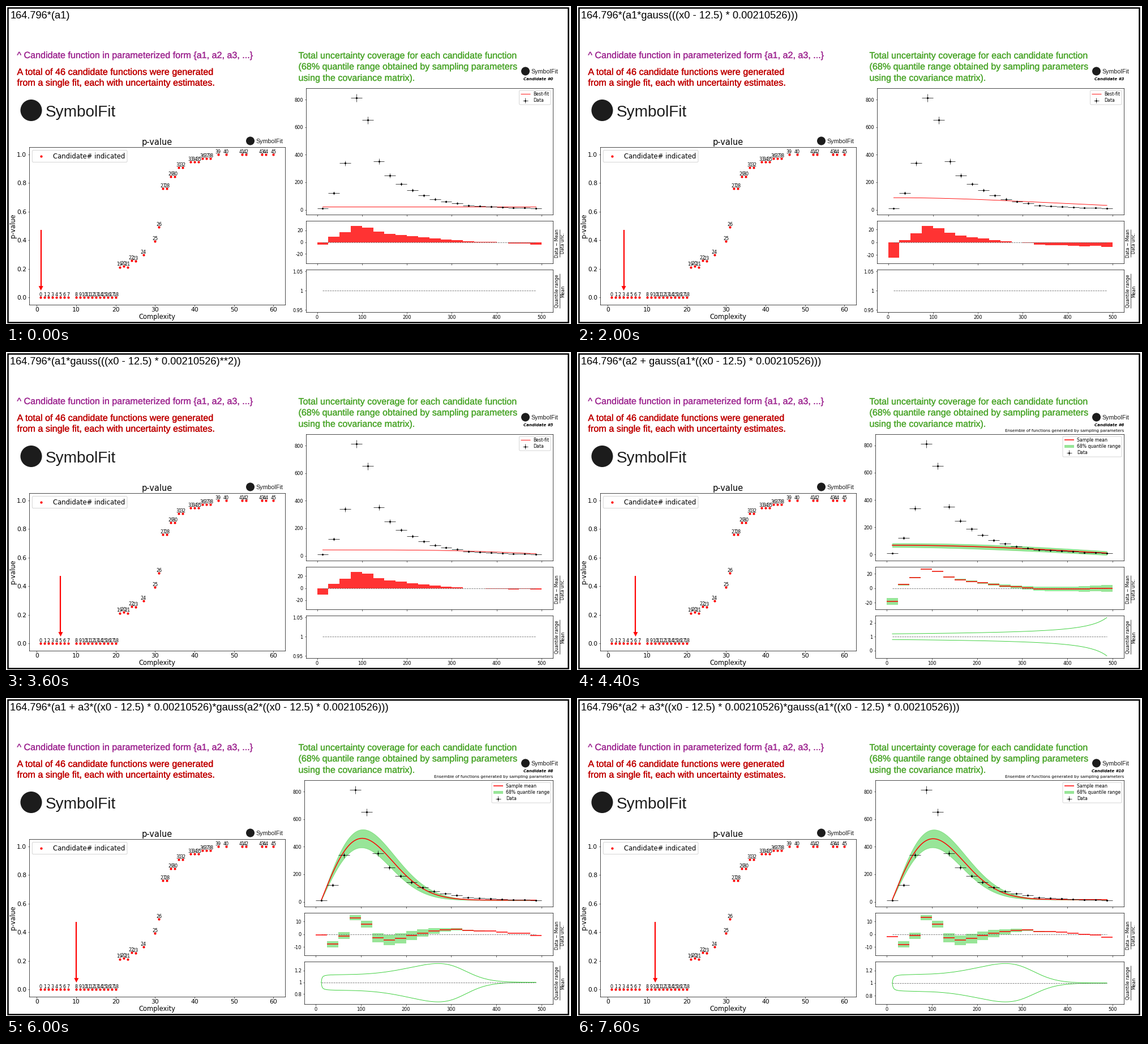
A matplotlib script that plays this animation: 998x561 px, repeating every 8000 ms.

```python
import numpy as np
import matplotlib.pyplot as plt
from matplotlib.animation import FuncAnimation
from matplotlib.patches import Circle, FancyBboxPatch, Polygon, Rectangle
from matplotlib.patheffects import withStroke

W, H, DPI = 998, 561, 72  # at 72 dpi one point is one pixel
FRAMES, INTERVAL = 20, 400
NORM = 164.796
DARK, LIME = "#1c1c1c", "limegreen"

plt.rcParams.update({"font.family": "DejaVu Sans", "axes.linewidth": 0.7})
fig = plt.figure(figsize=(W / DPI, H / DPI), dpi=DPI, facecolor="white")


def axes_at(left, top, right, bottom):
    return [left / W, 1 - bottom / H, (right - left) / W, (bottom - top) / H]


# ---------- candidate functions ----------

X = np.arange(12.5, 500, 25)
Y = np.array([10, 122, 339, 812, 650, 352, 248, 187, 142, 104,
              78, 60, 48, 33, 28, 25, 20, 15, 14, 9])
ERR = np.sqrt(Y)
GRID = np.linspace(12.5, 487.5, 400)


def scaled(x):
    return (x - 12.5) * 0.00210526


def gauss(u):
    return np.exp(-u ** 2)


def const(a):
    return lambda t: a + 0 * t


def bell(a, power=1):
    return lambda t: a * gauss(t ** power)


def slope_mean(t):
    return NORM * (-0.587 + gauss(0.658 * t))


def slope_spread(t):
    return (14 + 2.5 * np.sin(np.pi * t)) / slope_mean(t)


def hump_arg(t):
    return -1.257 + 4.23 * t


def hump_mean(t):
    return NORM * (0.086 + gauss(hump_arg(t)))


def hump_spread(t):
    u = hump_arg(t)
    grad = NORM * 2 * u * t * gauss(u) / hump_mean(t)
    return np.hypot(0.55 * grad, 0.02)


def peak(base, amp):
    def mean(t):
        return base + amp * t * gauss(3.71 * t)

    def spread(t):
        share = 1 - base / mean(t)
        return share * np.hypot(0.135, 2 * 3.71 * t ** 2 * 0.185)

    return mean, spread


TERM = "((x0 - 12.5) * 0.00210526)"


def peak_text(a, b, c):
    return f"{a} + {b}*{TERM}*gauss({c}*{TERM})"


# complexity, formula, mean, relative spread, (up, down) skew, tick steps
CANDIDATES = [
    (1, "a1", const(23), None, (1, 1), (20, 0.05)),
    (2, "a1", const(28), None, (1, 1), (20, 0.05)),
    (3, "a1", const(33), None, (1, 1), (20, 0.05)),
    (4, f"a1*gauss({TERM})", bell(88), None, (1, 1), (20, 0.05)),
    (5, f"a1*gauss({TERM})", bell(60), None, (1, 1), (20, 0.05)),
    (6, f"a1*gauss({TERM}**2)", bell(43, 2), None, (1, 1), (20, 0.05)),
    (7, f"a2 + gauss(a1*{TERM})", slope_mean, slope_spread, (1, 1), (20, 1)),
    (8, f"a2 + gauss(a1 + a3*{TERM})", hump_mean, hump_spread,
     (1, 0.9), (20, 0.5)),
    (10, peak_text("a1", "a3", "a2"), *peak(12, 3880), (1, 1.04), (10, 0.2)),
    (11, peak_text("a3", "a2", "a1"), *peak(14, 3850), (1, 1), (10, 0.2)),
    (12, peak_text("a2", "a3", "a1"), *peak(16, 3820), (1.04, 1), (10, 0.2)),
]

# ---------- stage overlay in pixel coordinates ----------

stage = fig.add_axes([0, 0, 1, 1], zorder=5)
stage.set_xlim(0, W)
stage.set_ylim(H, 0)
stage.axis("off")


def put(x, y, text, size, color="black", **kw):
    """Text with its baseline at y."""
    kw.setdefault("va", "baseline")
    return stage.text(x, y, text, size=size, color=color, **kw)


def caption(x, y, text, color, size=16.1):
    put(x, y, text, size, color, family="Liberation Sans",
        path_effects=[withStroke(linewidth=0.3, foreground=color)])


def upright(x, y, text, size):
    put(x, y, text, size, rotation=90, rotation_mode="anchor", ha="center")


def brand(x, y, radius, text_x, base, size):
    stage.add_patch(Circle((x, y), radius, color=DARK, lw=0))
    put(text_x, base, "SymbolFit", size, DARK, family="Liberation Sans")


def box(left, top, right, bottom):
    return stage.add_patch(FancyBboxPatch(
        (left, top), right - left, bottom - top,
        boxstyle="round,pad=0,rounding_size=1.8",
        fc="white", ec="#cccccc", lw=0.8))


def segment(xs, ys, color, lw):
    return stage.plot(xs, ys, color=color, lw=lw, solid_capstyle="butt")[0]


def data_key(x, y):
    return [segment([x - 4.3, x + 4.3], [y, y], "black", 0.7),
            segment([x, x], [y - 4.3, y + 4.3], "black", 0.7),
            stage.plot(x, y, "ko", ms=2.8, mew=0)[0]]


stage.add_patch(Rectangle((3.2, 3.2), 990.1, 555, fill=False, lw=2.5))

PURPLE, RED, GREEN = "#a02b93", "#c00000", "#4ea72e"
caption(19.5, 92, "^ Candidate function in parameterized form {a1, a2, a3, ...}",
        PURPLE)
caption(19.5, 121.5, "A total of 46 candidate functions were generated", RED, 16.2)
caption(19.5, 140.5, "from a single fit, each with uncertainty estimates.", RED, 16.2)
caption(516.5, 92.5, "Total uncertainty coverage for each candidate function", GREEN)
caption(516.5, 112, "(68% quantile range obtained by sampling parameters", GREEN)
caption(516.5, 132, "using the covariance matrix).", GREEN)

brand(44.5, 184, 19, 70, 194.5, 28)
brand(431.5, 238, 7.5, 441.5, 242, 10.6)
brand(917.5, 115, 7.5, 927.5, 119, 10.6)

formula = put(7.5, 22.3, "", 18.28, family="Liberation Sans")
heading = put(966, 131.3, "", 7.05, ha="right", weight="bold", style="italic")
subtitle = put(966, 140.5, "Ensemble of functions generated by sampling parameters",
               7.3, ha="right")

upright(975.6, 418.5, "Data \u2212 Mean", 7.6)
upright(985.9, 418.5, "Data unc.", 7.6)
segment([977.8] * 2, [394, 443], "black", 0.7)
upright(975.6, 503, "Quantile range", 7.7)
upright(986.7, 503, "Mean", 7.7)
segment([978.3] * 2, [472, 533], "black", 0.7)

fit_key = [
    box(906.5, 149, 962, 174),
    segment([909, 926], [155.3] * 2, "red", 0.9),
    put(931, 158, "Best-fit", 7.75),
    put(931, 169.3, "Data", 7.75),
    *data_key(917.5, 166.6),
]
band_key = [
    box(858, 149, 962, 185),
    segment([861, 878], [155.3] * 2, "red", 1.5),
    stage.add_patch(Rectangle((861, 163.7), 17, 5.6, color=LIME, alpha=0.5, lw=0)),
    put(883, 158, "Sample mean", 7.75),
    put(883, 169.3, "68% quantile range", 7.75),
    put(883, 180.4, "Data", 7.75),
    *data_key(869.5, 177.7),
]

arrow_shaft = segment([0, 0], [394.8, 496], "red", 2.2)
arrow_head = stage.add_patch(Polygon([(0, 0)] * 3, color="red", lw=0))

# ---------- p-value panel ----------

pval = fig.add_axes(axes_at(40.8, 249.4, 493, 526.6))
pval.set_xlim(-1.95, 62.95)
pval.set_ylim(-0.05, 1.05)
pval.set_xticks(range(0, 61, 10))
pval.set_yticks(np.arange(0, 1.1, 0.2))
pval.tick_params(labelsize=10.8, length=2.5, width=0.6, pad=2.2)

complexity = [*range(1, 9), *range(10, 26), 27, *range(30, 38), *range(39, 45),
              46, 48, 52, 53, 57, 58, 60]
p_values = ([0] * 19 + [0.212, 0.218, 0.212, 0.258, 0.254, 0.296, 0.391, 0.492]
            + [0.762] * 2 + [0.845] * 2 + [0.907] * 2
            + [0.948] * 3 + [0.972] * 3 + [1] * 7)
pval.plot(complexity, p_values, "o", color="red", ms=4.2, mew=0)
for n, (cx, p) in enumerate(zip(complexity, p_values)):
    pval.annotate(str(n), (cx, p), (0, 2.3), textcoords="offset points",
                  ha="center", va="baseline", size=8)

put(266.8, 245.1, "p-value", 14.5, ha="center")
put(266.8, 552, "Complexity", 11.5, ha="center")
upright(16, 388, "p-value", 11.5)
box(46.3, 254.5, 214, 275.5)
stage.plot(62.5, 265, "o", color="red", ms=4.2, mew=0)
put(83, 269, "Candidate# indicated", 11.6)

# ---------- fit panels ----------

main, resid, ratio = (fig.add_axes([0, 0, 1, 1]) for _ in range(3))
SPANS = ((main, 145, 368.3), (resid, 379.3, 454), (ratio, 465, 539.5))


def set_scale(ax, lo, hi, step):
    first, last = int(np.ceil(lo / step)), int(np.floor(hi / step))
    ticks = [n * step for n in range(first, last + 1)]
    ax.set_ylim(lo, hi)
    ax.set_yticks(ticks, [f"{v:.6g}" for v in ticks])


def padded(lo, hi, pad=0.05):
    gap = (hi - lo) * pad
    return lo - gap, hi + gap


def dashed(ax, level):
    ax.plot([12.5, 487.5], [level, level], color="#6a6a6a", lw=0.8,
            dashes=(3.7, 1.6), zorder=4)


def reset_panels(left):
    for ax, top, bottom in SPANS:
        ax.clear()
        ax.set_position(axes_at(left, top, 965.8, bottom))
        ax.set_xlim(-25, 525)
        ax.set_xticks(range(0, 501, 100))
        ax.tick_params(labelsize=8.3, length=2.5, width=0.6, pad=2.6,
                       labelbottom=ax is ratio)


def draw_data():
    main.hlines(Y, X - 12.5, X + 12.5, color="black", lw=0.7, zorder=3)
    main.vlines(X, Y - ERR, Y + ERR, color="black", lw=0.7, zorder=3)
    main.plot(X, Y, "ko", ms=3.2, mew=0, zorder=3)


def draw_best_fit(mean, steps):
    main.plot(GRID, mean(scaled(GRID)), color="red", lw=0.9)
    set_scale(main, *padded((Y - ERR).min(), (Y + ERR).max()), 200)

    pull = (Y - mean(scaled(X))) / ERR
    resid.bar(X, pull, 25, color="red", alpha=0.8, lw=0)
    top = 1.3 * abs(pull).max()
    set_scale(resid, -top, top, steps[0])
    set_scale(ratio, 0.945, 1.055, steps[1])


def draw_ensemble(mean, spread, skew, steps):
    t = scaled(GRID)
    mid, rel = mean(t), spread(t)
    high, low = 1 + skew[0] * rel, 1 - skew[1] * rel
    main.fill_between(GRID, mid * low, mid * high, color=LIME, alpha=0.5, lw=0.8)
    main.plot(GRID, mid, color="red", lw=1.5)
    floor = min((Y - ERR).min(), (mid * low).min())
    set_scale(main, *padded(floor, (Y + ERR).max()), 200)

    t = scaled(X)
    mid, rel = mean(t), spread(t)
    pull = (Y - mid) / ERR
    below, above = (mid * rel * k / ERR for k in skew)
    resid.bar(X, below + above, 25, bottom=pull - below,
              color=LIME, alpha=0.5, lw=0)
    resid.hlines(pull, X - 12.5, X + 12.5, color="red", lw=1.5, zorder=5)
    top = 1.1 * max(abs(pull - below).max(), abs(pull + above).max())
    set_scale(resid, -top, top, steps[0])

    ratio.plot(GRID, high, color=LIME, lw=0.9)
    ratio.plot(GRID, low, color=LIME, lw=0.9)
    set_scale(ratio, *padded(low.min(), high.max()), steps[1])


def draw(i):
    number = (i + 1) // 2
    cplx, text, mean, spread, skew, steps = CANDIDATES[number]
    ensemble = spread is not None

    formula.set_text(f"{NORM}*({text})")
    heading.set_text(f"Candidate #{number}")
    subtitle.set_visible(ensemble)
    for part in fit_key:
        part.set_visible(not ensemble)
    for part in band_key:
        part.set_visible(ensemble)

    x = 54.7 + 6.962 * cplx
    arrow_shaft.set_xdata([x, x])
    arrow_head.set_xy([(x - 4, 494), (x + 4, 494), (x, 502)])

    reset_panels(527 if ensemble else 529.7)
    draw_data()
    if ensemble:
        draw_ensemble(mean, spread, skew, steps)
    else:
        draw_best_fit(mean, steps)
    dashed(resid, 0)
    dashed(ratio, 1)
    return []


anim = FuncAnimation(fig, draw, frames=FRAMES, interval=INTERVAL,
                     repeat=True, repeat_delay=0, blit=False)
plt.show()
```
